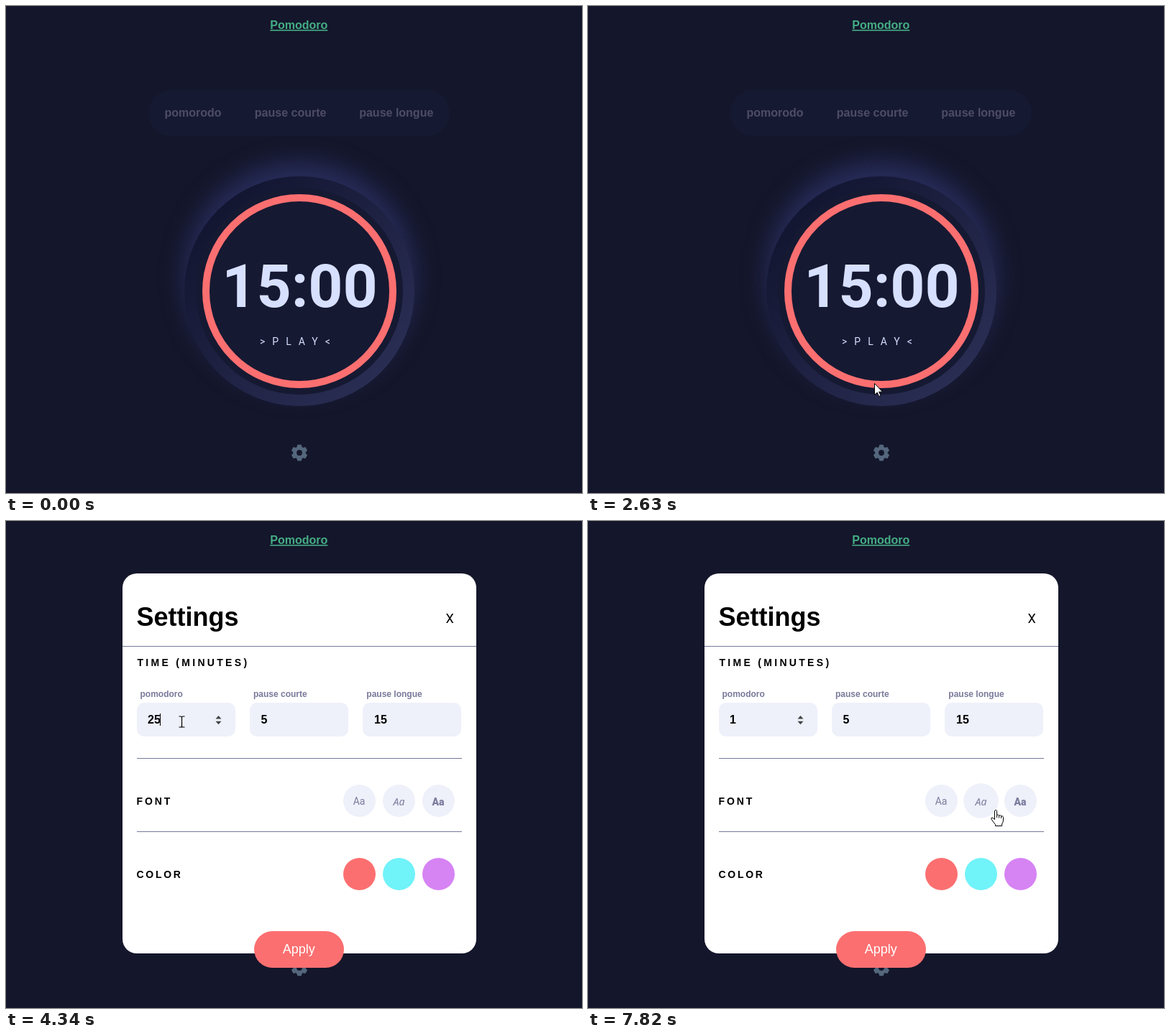
These frames come from a looping animation (801x678 px, 7.99 s). An HTML page:

```html
<!DOCTYPE html>
<html lang="fr">
<head>
<meta charset="utf-8">
<title>Pomodoro</title>
<style>
  html, body { margin: 0; width: 100%; height: 100%; overflow: hidden; background: #14162b; }
  svg { display: block; width: 801px; height: 678px; }
  text { font-family: "Liberation Sans", Arial, sans-serif; font-weight: 700; white-space: pre; }
  .roboto { font-family: Roboto, sans-serif; }
  .tab { font-size: 16px; fill: #4e4c66; }
  .head { font-size: 14px; }
  .label { font-size: 12px; fill: #79799a; }
  .value { font-size: 16px; }
  .sample { font-size: 14px; font-weight: 400; fill: #7a7c9c; text-anchor: middle; }
  .field, .chip { fill: #eef0fa; }
  .rule { stroke: #75799c; stroke-width: 1; }
</style>
</head>
<body>
<svg viewBox="0 0 801 678">
  <defs>
    <linearGradient id="rim" x1="0" y1="0" x2="1" y2="1">
      <stop offset="0" stop-color="#0e112a"/>
      <stop offset="1" stop-color="#2e325a"/>
    </linearGradient>
    <filter id="soft" x="-30%" y="-30%" width="160%" height="160%" color-interpolation-filters="sRGB">
      <feGaussianBlur stdDeviation="16"/>
    </filter>
  </defs>

  <rect width="801" height="678" fill="#14162b"/>
  <text x="367.3" y="32" font-size="16" fill="#44ac84" text-decoration="underline">Pomodoro</text>

  <rect x="198" y="117" width="419" height="64" rx="32" fill="#161932"/>
  <text class="tab" x="220.5" y="154">pomorodo</text>
  <text class="tab" x="345.8" y="154">pause courte</text>
  <text class="tab" x="491.2" y="154">pause longue</text>

  <circle cx="408" cy="377" r="160" fill="#272c5a" filter="url(#soft)"/>
  <circle cx="408" cy="397" r="160" fill="url(#rim)"/>
  <circle cx="408" cy="397" r="144" fill="#161932"/>
  <circle cx="408" cy="397" r="130" fill="none" stroke="#fc6f70" stroke-width="10"/>
  <text class="roboto" x="408.5" y="418.5" font-size="84" fill="#d7e0ff" text-anchor="middle">15:00</text>
  <text class="roboto" x="353" y="472" style="font-size:14px;font-weight:400;letter-spacing:10px" fill="#d7e0ff">&gt;PLAY&lt;</text>

  <g id="gear"></g>

  <g id="modal">
    <rect x="162" y="73" width="492" height="529" rx="20" fill="#fff"/>
    <text x="181.5" y="146" font-size="36">Settings</text>
    <text class="roboto" x="611.6" y="142" style="font-size:18px;font-weight:400">X</text>
    <path class="rule" d="M162 174.5H654M182 330.5H634M182 432.5H634"/>
    <text class="head" x="182.5" y="202" letter-spacing="3.3">TIME (MINUTES)</text>
    <text class="head" x="181.5" y="395" letter-spacing="2.9">FONT</text>
    <text class="head" x="181.5" y="497" letter-spacing="2.7">COLOR</text>
    <text class="label" x="186.5" y="245">pomodoro</text>
    <text class="label" x="344" y="245">pause courte</text>
    <text class="label" x="501.3" y="245">pause longue</text>
    <rect class="field" x="182" y="253" width="137" height="47" rx="10"/>
    <rect class="field" x="339" y="253" width="137" height="47" rx="10"/>
    <rect class="field" x="496" y="253" width="137" height="47" rx="10"/>
    <rect id="mark" y="268" height="18" fill="#0078d7"/>
    <text class="value" x="197" y="282"><tspan id="plain"></tspan><tspan id="picked" fill="#fff"></tspan></text>
    <rect id="caret" y="268" width="1" height="17"/>
    <path id="spin" d="M291.5 275.5h8l-4-4.5zM291.5 278.8h8l-4 4.5z" fill="#444"/>
    <text class="value" x="354.5" y="282">5</text>
    <text class="value" x="512" y="282">15</text>
    <circle class="chip" cx="491.5" cy="389.5" r="22.5"/>
    <circle class="chip" id="chip" cx="546.5" cy="389.5" r="22.5"/>
    <circle class="chip" cx="601.5" cy="389.5" r="22.5"/>
    <text class="sample" x="491" y="395" style="font-family:Roboto,sans-serif">Aa</text>
    <text class="sample" x="546.5" y="396" style="font-family:'Noto Sans',sans-serif;font-style:italic">Aa</text>
    <text class="sample" x="601" y="395.5" style="font-family:Roboto,sans-serif;font-weight:900;font-stretch:75%">Aa</text>
    <circle cx="491.5" cy="491.5" r="22.5" fill="#fc6f70"/>
    <circle cx="546.5" cy="491.5" r="22.5" fill="#70f3f9"/>
    <circle cx="601.5" cy="491.5" r="22.5" fill="#d683f3"/>
    <g id="apply">
      <rect x="345" y="571" width="125" height="51" rx="25.5" fill="#fc6f70"/>
      <text x="384.8" y="602" style="font-size:18px;font-weight:400" fill="#fff">Apply</text>
    </g>
  </g>

  <g id="cursor" stroke-linejoin="round">
    <path id="arrow" d="M.5 .5V16.5L4.2 13L6.7 18.5L9 17.5L6.6 12.2H11.6Z" fill="#fff" stroke="#000"/>
    <path id="beam" d="M-4 -7.5H-1.5Q0 -7.5 0 -6V6Q0 7.5 -1.5 7.5H-4M4 -7.5H1.5Q0 -7.5 0 -6M0 6Q0 7.5 1.5 7.5H4" fill="none" stroke-width="1.2"/>
    <path id="hand" d="M-1.5 1.5Q0 -1 1.6 1.5V7.5Q3.4 6 4.6 8Q6.4 6.8 7.6 8.8Q9.6 7.8 10.5 10.5V15Q10 18 8.6 20V22.5H-.5V20.5Q-3.5 17 -6 13.2Q-7 10.5 -4.2 11.2L-1.5 13.5ZM1.6 7.5V11M4.6 8V11.5M7.6 8.8V12" fill="#fff" stroke="#000"/>
  </g>
</svg>
<script>
const LOOP = 7990;
const $ = id => document.getElementById(id);
const show = (el, on) => { el.style.display = on ? "" : "none"; };
const clamp = v => Math.min(1, Math.max(0, v));

// start, end, number of steps, evenly timed path points
const moves = [
  [110, 260, 3, "668,660 666,608 663,558"],
  [420, 1200, 11, "669,542 673,500 640,442 560,410 500,406 420,424 374,448"],
  [1270, 1270, 1, "373,447"],
  [1440, 2060, 9, "366,438 355,416 351,405 420,472 416,499"],
  [2230, 2300, 2, "417,486 416,477"],
  [2470, 2630, 3, "413,490 405,512 398,525"],
  [2770, 2850, 2, "395,504 391,487"],
  [3060, 3220, 3, "394,530 403,585 408,623"],
  [3480, 3800, 5, "402,600 372,505 330,390 290,290 268,229"],
  [3880, 4190, 5, "262,240 257,254 251,268 246,276 244,279"],
  [4570, 4800, 4, "230,281 208,285 192,289 182,291"],
  [5270, 5590, 5, "198,314 235,350 266,361 288,318 293,277"],
  [5730, 5810, 2, "295,281 296,283"],
  [6040, 6810, 11, "296,283 294,283 280,284 170,292 96,297"],
  [7590, 7820, 4, "190,312 370,356 510,388 567,402"]
].map(([a, b, n, s]) => ({ a, b, n, pts: s.split(" ").map(p => p.split(",").map(Number)) }));

const shapes = [[0, ""], [110, "arrow"], [1515, "beam"], [1900, "arrow"], [3200, "hand"],
  [3480, "arrow"], [3950, "beam"], [5260, "arrow"], [6180, "beam"], [7590, "arrow"], [7820, "hand"]];

// time, text, selected characters, caret shown
const edits = [[0, "25", 0, 0], [4340, "25", 0, 1], [4640, "25", 1, 0], [4720, "25", 2, 0],
  [5730, "24", 0, 1], [5810, "23", 0, 1], [6040, "22", 0, 1], [6120, "20", 0, 1],
  [6190, "19", 0, 1], [6270, "18", 0, 1], [6350, "17", 0, 1], [6570, "17", 1, 0],
  [6650, "17", 2, 0], [7270, "1", 0, 1], [7780, "1", 0, 0]];

const pressing = [[0, 1], [3400, 1.016], [3480, 1.05], [3560, 1.03], [3640, 1]];

const at = (table, t) => table.findLast(row => row[0] <= t);

function place(t) {
  const m = moves.findLast(m => m.a <= t);
  if (!m) return [0, 0];
  const gap = (m.b - m.a) / (m.n - 1) || 1;
  const step = Math.min(m.n - 1, Math.floor((t - m.a) / gap + 0.25));
  const u = m.n > 1 ? step / (m.n - 1) * (m.pts.length - 1) : 0;
  const i = Math.floor(u), p = m.pts[i], q = m.pts[i + 1] || p;
  return p.map((v, k) => Math.round(v + (q[k] - v) * (u - i)));
}

const teeth = [0, 60, 120, 180, 240, 300].map(a =>
  `<path d="M-3.9 -7L-2.7 -11.2H2.7L3.9 -7Z" transform="rotate(${a})"/>`).join("");
$("gear").innerHTML = `<circle r="8.7"/>${teeth}<circle r="3.9" fill="#14162b"/>`;

function drawGear(t) {
  const k = clamp((t - 3140) / 160) * clamp((3760 - t) / 260);
  const tone = [84, 103, 124].map((v, i) => Math.round(v + ([122, 126, 160][i] - v) * k));
  $("gear").setAttribute("fill", `rgb(${tone})`);
  $("gear").setAttribute("transform", `translate(${408 + k} 622) rotate(${30 * k}) scale(${1 + 0.26 * k})`);
}

function drawField(t) {
  const [, text, sel, caret] = at(edits, t);
  const cut = text.length - sel, end = 197 + 8.9 * text.length;
  $("plain").textContent = text.slice(0, cut);
  $("picked").textContent = text.slice(cut);
  $("mark").setAttribute("x", end - 8.9 * sel);
  $("mark").setAttribute("width", 8.9 * sel);
  $("caret").setAttribute("x", Math.floor(end));
  show($("caret"), caret);
  show($("spin"), t >= 3950);
}

function drawCursor(t) {
  const [x, y] = place(t), shape = at(shapes, t)[1];
  for (const id of ["arrow", "beam", "hand"]) show($(id), id === shape);
  const half = shape === "beam" ? 0.5 : 0;
  $("cursor").setAttribute("transform", `translate(${x + half} ${y + half})`);
  $("beam").setAttribute("stroke", t < 3400 || x < 160 ? "#fff" : "#000");
}

function draw(t) {
  const s = at(pressing, t)[1];
  show($("modal"), t >= 3400);
  $("apply").setAttribute("transform", `translate(407.5 596.5) scale(${s}) translate(-407.5 -596.5)`);
  $("chip").setAttribute("r", t >= 7820 ? 24.2 : 22.5);
  drawGear(t);
  drawField(t);
  drawCursor(t);
}

const start = performance.now();
function tick() {
  draw((performance.now() - start) % LOOP);
  requestAnimationFrame(tick);
}
tick();
</script>
</body>
</html>
```
